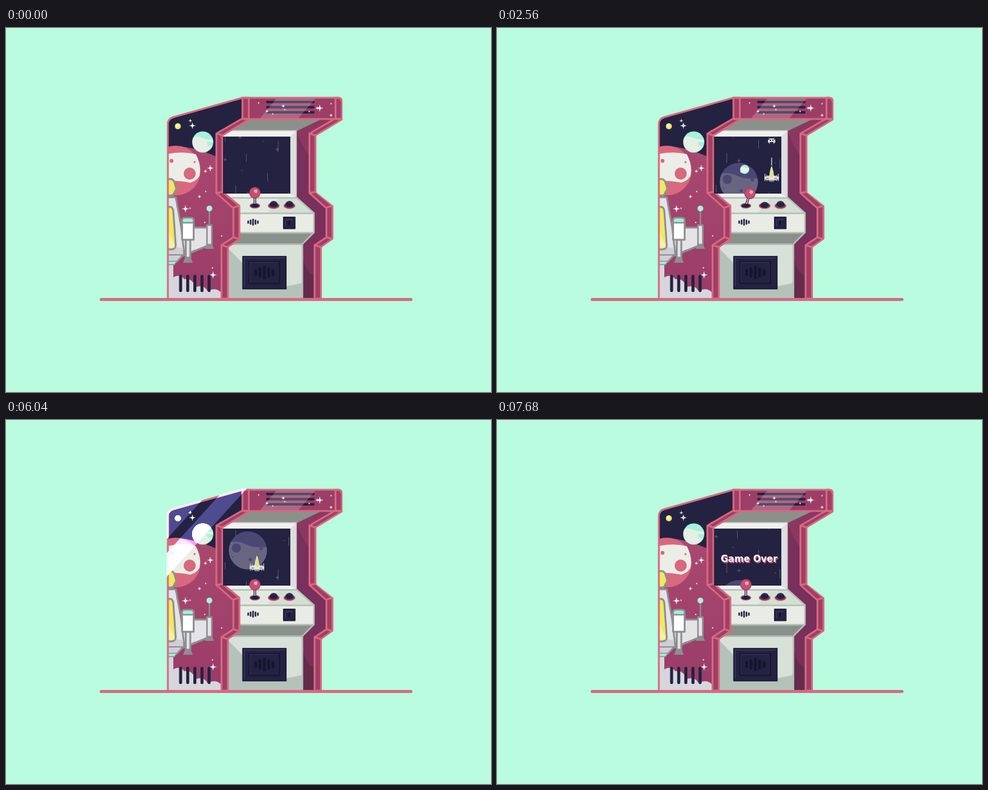
Recreate the animation shown at these times as an HTML page. Size 800 px wide and 600 px high, loop 7720 ms.

```html
<!DOCTYPE html>
<html lang="en">
<head>
<meta charset="utf-8">
<title>Arcade cabinet</title>
<style>
html, body { margin: 0; width: 100%; height: 100%; overflow: hidden; background: #b9fcdf; }
svg { display: block; width: 800px; height: 600px; }
.edge { fill: none; stroke: #d8687f; stroke-width: 3; stroke-linejoin: round; }
.metal { fill: #e4e4e7; stroke: #8d8f93; stroke-width: 3; stroke-linejoin: round; }
.bars { stroke: #232241; stroke-linecap: round; fill: none; }
.line { fill: none; stroke: #3a3960; stroke-width: 1.5; }
#shine { mix-blend-mode: color-dodge; fill: #8c8c8c; }
#over { font: bold 15px "DejaVu Sans", sans-serif; }
</style>
</head>
<body>
<svg viewBox="0 0 800 600">
<defs>
  <clipPath id="sideClip"><path d="M267 446V158Q267 150 276 147L390 115V150L347 175V272L375 296V345L355 358V446Z"/></clipPath>
  <clipPath id="screenClip"><path d="M358 179H469V273H358Z"/></clipPath>
  <clipPath id="cabinetClip"><path clip-rule="evenodd" d="M265 445V158Q265 148 276 145L390 113H547Q555 113 555 121V152L512 178V271L540 293V348L522 361V445ZM358 179V273H469V179Z"/></clipPath>
  <clipPath id="dimClip"><circle r="31.5"/></clipPath>
  <clipPath id="mintClip"><circle cx="324.5" cy="188" r="16.5"/></clipPath>
  <linearGradient id="dune" x2="0" y2="1"><stop stop-color="#a9486f"/><stop offset="1" stop-color="#993c68"/></linearGradient>
  <filter id="streak" x="-20%" y="-60%" width="140%" height="220%"><feGaussianBlur stdDeviation="0 2"/></filter>
  <g id="trim">
    <path class="edge" style="fill:#a03f66" d="M390 115H400.5V151L357 177V270L385 293V348L366 361V446H355.5V358L375 345V297L347 272V174L390 149Z"/>
    <path class="edge" d="M390 150H400M347 174L357 177M347 272L357 270M375 296L385 293M375 345L385 348M355 358L366 361"/>
  </g>
</defs>

<!-- side art -->
<g clip-path="url(#sideClip)">
  <path fill="#232241" d="M260 110H400V450H260Z"/>
  <path fill="url(#dune)" d="M260 198C285 190 322 200 347 212L400 230V450H260Z"/>
  <g id="sideStars" fill="#fff"></g>
  <circle cx="280" cy="235" r="41" fill="#d9687f"/>
  <path fill="#ebeee6" d="M260 209Q290 202 313 208Q323 226 319 244Q314 252 304 255Q284 251 260 252Z"/>
  <g fill="#d9687f"><circle cx="273" cy="219" r="3.2"/><circle cx="303" cy="240" r="10"/><circle cx="311" cy="221" r="1.7"/></g>
  <circle cx="324.5" cy="188" r="17.5" fill="#a6f2dc"/>
  <path fill="#e6efe4" clip-path="url(#mintClip)" d="M306 181Q315 177 324 181T343 183V207H306Z"/>
  <path fill="#a6f2dc" d="M331 188H341V194H333Z"/>
  <circle cx="283.5" cy="162" r="5" fill="#eee56d"/><circle cx="282.5" cy="161" r="3" fill="#f5f0ad"/>
  <path fill="#d6d6dc" d="M260 388H276V411Q287 405 294 414Q307 412 313 427Q326 422 332 433Q349 426 356 438V450H260Z"/>
  <path class="metal" d="M288 329H337V357L303 371L290 376Z"/>
  <path class="metal" d="M260 279H280L289 329L294 372L282 385H260Z"/>
  <path fill="#cfcfd5" d="M260 345Q276 364 292 362V372L281 384H260Z"/>
  <path fill="none" stroke="#8d8f93" stroke-width="2" d="M260 374H297L312 366"/>
  <path fill="#9ff0d8" stroke="#8d8f93" stroke-width="1.5" d="M260 384.5H282L278 390H260Z"/>
  <g fill="#f0e95d" stroke="#8d8f93" stroke-width="3">
    <path d="M260 249H273L277 252L281 265L275 276H260Z"/>
    <path d="M260 295H272Q275 296 276 302L280 358Q279 365 273 365H260Z"/>
  </g>
  <path fill="#f6f2a4" d="M267 330Q272 349 278 356V362H267Z"/>
  <path class="metal" d="M296.5 349H304V380H296.5Z"/>
  <path fill="#8d8f93" d="M296 377H304L308 387H292Z"/>
  <path class="metal" style="fill:#fff" d="M290.5 316Q291 313 295 313H305Q309 313 309.5 316V349H290.5Z"/>
  <path fill="#9ff0d8" d="M292 321V317Q292 314.5 295 314.5H305Q308 314.5 308 317V321Z"/>
  <path stroke="#8d8f93" stroke-width="2.5" d="M335.5 302V326M290 321H310"/>
  <path class="metal" style="stroke-width:2.5" d="M331.5 325H339.5V357H331.5Z"/>
  <path fill="#8d8f93" d="M331 357H340L343 364H328Z"/>
  <circle cx="335.5" cy="297.5" r="4.8" fill="#a6f2dc"/>
  <path id="vents" class="bars" stroke-width="5"/>
</g>
<path class="edge" d="M267 446V158Q267 150 276 147L392 114.5"/>

<!-- hood, inner wall, bezel -->
<path fill="#79305a" d="M400 151H545L500 175V272L528 296V345L509 358V446H489V356L508 337V304L479 280V169Z"/>
<path fill="#8b3860" d="M519 151H545L500 175V210Q486 190 479 169Z"/>
<path fill="#642c4b" d="M489 376Q494 402 509 409V446H489Z"/>
<path fill="#8a918b" d="M398 151H519L479 170H362Z"/>
<path fill="#f0f1ef" d="M356 169H479V280H356Z"/>
<path fill="#dcdfdd" d="M469 179L478 170V279L469 273Z"/>
<path fill="none" stroke="#c9bcc4" stroke-width="1.5" d="M360 169H479V280"/>
<path fill="#232241" d="M358 179H469V273H358Z"/>

<g clip-path="url(#screenClip)">
  <g id="sky" stroke="#67667f" fill="#67667f"></g>
  <g id="dim" clip-path="url(#dimClip)">
    <circle r="31.5" fill="#4a4775"/>
    <path fill="#676580" d="M-33 -13Q-18 -17 -3 -10T33 -6V33H-33Z"/>
    <g fill="#4a4775"><circle cx="-19" cy="-4" r="7.5"/><circle cx="22" cy="-3" r="2.6"/><circle cx="4" cy="15" r="2.6"/><circle cx="-25" cy="11" r="1.2"/></g>
  </g>
  <g id="red">
    <circle r="16.5" fill="#d9687f"/>
    <path fill="#ebeee6" d="M-16 -10Q0 -14 13 -9Q18 2 12 9Q0 14 -16 10Z"/>
    <g fill="#d9687f"><circle cx="4" cy="1" r="4"/><circle cx="11" cy="-4" r="1"/></g>
  </g>
  <g id="yellow">
    <circle r="12.8" fill="#f1e754"/>
    <path fill="#f6f4cc" d="M-12 -4Q-6 -8 0 -5T12 -4V3Q8 2 4 6T-11 5Z"/>
    <circle cx="6" cy="3" r="2.5" fill="#f1e754"/>
  </g>
  <g id="mint">
    <circle r="7.5" fill="#a6f2dc"/>
    <path fill="#e6f3e6" d="M-7 -2Q-3 -5 0 -3T7 -3V2Q2 6 -3 6T-7 2Z"/>
  </g>
  <path id="laser" stroke="#c9c8d1" stroke-width="1.5" d="M0 0V13"/>
  <g id="alien" fill="#dededf">
    <path d="M-4 -2L-2 -4H2L4 -2H6V3H4V2H-4V3H-6V-2Z"/>
    <path stroke="#dededf" d="M-3 -3L-5 -5M3 -3L5 -5M-3 2L-4 5M3 2L4 5"/>
    <path fill="#232241" d="M-3 -2h2v2h-2zM1 -2h2v2h-2z"/>
  </g>
  <g id="ship">
    <path stroke="#b9b9bd" stroke-width="1.5" d="M-11 0V12M11 0V12M-8 2V12M8 2V12"/>
    <path fill="#dedee0" d="M-12 5L-4 3H4L12 5V9L4 11H-4L-12 9Z"/>
    <path fill="#8d8f93" d="M-9 7H9V8.5H-9ZM-4 10H4V13H-4Z"/>
    <path fill="#e6e6e2" d="M-.7 -12H.7L3 -3L4.5 10H-4.5L-3 -3Z"/>
    <path fill="#eadf5a" d="M-1 -8H1L2 0V6H-2V0Z"/>
  </g>
  <path id="glint" fill="#fff" opacity=".22"/>
  <g id="over">
    <text x="370.5" y="235.5" fill="#d9566f" aria-hidden="true">Game Over</text>
    <text x="369" y="234" fill="#fff">Game Over</text>
  </g>
</g>

<!-- control deck and lower front -->
<path fill="#d3dfd5" d="M357 280H480L508 305H385Z"/>
<path fill="#e1e9e0" d="M357 280H450L430 305H385Z"/>
<path fill="#e9ece5" d="M385 305H508V337H385Z"/>
<path fill="#8a918b" d="M385 337H508L489 356H364Z"/>
<path fill="#d7e1d7" d="M366 356H489V446H366Z"/>
<path fill="#b4c2ba" d="M366 363L392 389L430 427Q460 428 489 420V446H366Z"/>
<path fill="none" stroke="#b4beb8" stroke-width="2.5" d="M357 280H480L508 305V337L489 356V446M385 305.5H508M385 337.5H508M366 356.5H489"/>
<path id="speaker" class="bars" stroke-width="2.6"/>
<path fill="#232241" stroke="#15162d" d="M457.5 311.5H477V331H457.5Z"/>
<path class="line" d="M461 327V316H473"/><path stroke="#101126" stroke-width="2" d="M467 317V325"/>
<path fill="#232241" stroke="#14152c" stroke-width="1.5" d="M390.5 376.5H462V430H390.5Z"/>
<path class="line" d="M393 427V379H460M402 420V386H450"/>
<path class="line" style="stroke:#14152c" d="M401 385H451V421H401Z"/>
<path id="door" class="bars" style="stroke:#14152c" stroke-width="4.5"/>

<g id="buttons"></g>
<ellipse cx="410.5" cy="293" rx="8" ry="3.8" fill="#232241" stroke="#b64b6e" stroke-width="1.5"/>
<g id="stick">
  <path stroke="#15162d" stroke-width="4" d="M410.5 277V292"/><path stroke="#f0f1ef" stroke-width="1.5" d="M410.5 277V290"/>
  <circle cx="410.5" cy="271.5" r="8.8" fill="#c4506f" stroke="#a13a60" stroke-width="1.2"/>
  <circle cx="412" cy="269" r="3" fill="#e9a3b2"/>
</g>

<!-- marquee and trims -->
<path fill="#9c3e66" d="M398 115H545V151H398Z"/>
<path class="bars" stroke-width="4" d="M431 122H507M431 130.500H507M431 139H507"/>
<g id="signStars" fill="#fff"></g>
<path fill="#fff" opacity=".2" d="M447 115H512L481 150H418Z"/>
<g clip-path="url(#cabinetClip)"><use href="#trim"/><use href="#trim" x="153.5"/></g>
<path class="edge" d="M390 115H547Q553.5 115 553.5 122M390 150H553"/>

<g id="shine" clip-path="url(#cabinetClip)"><g id="bands"></g></g>
<path stroke="#d56b84" stroke-width="5" stroke-linecap="round" d="M157 447.5H668"/>
</svg>

<script>
const LOOP = 7720, STEP = 40;
const $ = id => document.getElementById(id);
const move = (id, x, y) => $(id).setAttribute('transform', `translate(${x} ${y})`);
const show = (id, on) => $(id).style.display = on ? '' : 'none';
const repeat = (n, fn) => Array.from({ length: n }, (_, i) => fn(i)).join('');

let seed = 11;
const random = (min, max) => {
  seed = (seed * 16807) % 2147483647;
  return min + (max - min) * seed / 2147483647;
};

// Four-point sparkle
const sparkle = (x, y, r) => `<path stroke="#fff" stroke-width=".4" d="M${x} ${y - r}Q${x} ${y} ${x + r} ${y}Q${x} ${y} ${x} ${y + r}Q${x} ${y} ${x - r} ${y}Q${x} ${y} ${x} ${y - r}"/>`;
// Small stars spread evenly down or across a box, with seeded jitter
const scatter = (n, left, top, right, bottom) => repeat(n, i => {
  const x = random(left, right), y = top + (bottom - top) * (i + random(0, 1)) / n;
  return sparkle(x, y, i % 2 ? 2.6 : 1.3);
});
$('sideStars').innerHTML = sparkle(307.5, 161, 5) + sparkle(337, 231, 5) + sparkle(296, 298, 5.5) +
  sparkle(341.5, 407, 5.5) + scatter(22, 276, 140, 366, 410);
$('signStars').innerHTML = sparkle(517.5, 132, 5.5) + scatter(5, 408, 119, 460, 147) + scatter(4, 500, 119, 538, 147);

// Row of upright bars, shorter by `drop` per place from the middle
const bars = (x, gap, y, height, drop) => repeat(5, i => {
  const h = height - drop * Math.abs(i - 2);
  return `M${x + gap * i} ${y - h / 2}v${h}`;
});
$('vents').setAttribute('d', bars(288, 11.75, 421, 23.5, 0));
$('speaker').setAttribute('d', bars(399.5, 4, 320, 9, 3));
$('door').setAttribute('d', bars(412, 7.1, 403, 18, 5.5));

$('buttons').innerHTML = repeat(2, i => `<g transform="translate(${441.5 + 26 * i} 293)">
  <ellipse rx="9" ry="4.5" fill="#7a2e53" stroke="#c9526f" stroke-width="1.5"/>
  <g id="cap${i}"><path fill="#232241" d="M-7 -2Q-5 -8 0 -8T7 -2Q5 2 0 2T-7 -2"/>
  <path fill="none" stroke="#45446d" d="M-3 -5.5Q0 -7 3 -5.5"/></g></g>`);

// One tile of sky, stacked so that it can scroll without end
const TILE = 138;
const cross = (x, y) => `<path d="M${x - 2.5} ${y}h5m-2.5 -2.5v5"/>`;
const tile = cross(386, 180) + cross(447.5, 200) + cross(361.5, 217) + cross(399, 273) +
  repeat(7, i => `<path opacity=".8" d="M${361.5 + 17.5 * i} ${175 + i * 85 % TILE}v${12 + i * 5 % 9}"/>`) +
  repeat(3, i => `<circle cx="${389 + 35 * i}" cy="${235 - 48 * i}" r=".8" stroke="none"/>`);
$('sky').innerHTML = repeat(4, i => `<g transform="translate(0 ${TILE * (i - 2)})">${tile}</g>`);

// Slanted light bands lie between lines 1.1x + y = a and b
const SLANT = 1.1;
const band = (a, b) => {
  const x = (s, y) => (s - y) / SLANT;
  return `M${x(a, 100)} 100H${x(b, 100)}L${x(b, 450)} 450H${x(a, 450)}Z`;
};
$('bands').innerHTML = `<path d="${band(-142, -62)}"/><path d="${band(-39, 0)}"/>`;
$('glint').setAttribute('d', band(-70, 0));

const ramp = (t, from, to) => Math.min(1, Math.max(0, (t - from) / (to - from)));
const ease = (t, from, to) => { const p = ramp(t, from, to); return p * p * (3 - 2 * p); };

// Steering from -1 (left) to 1 (right); it leans the stick and shifts the ship
const steer = t => ease(t, 1700, 2400) - ease(t, 2800, 3500) - ease(t, 4100, 4900) + ease(t, 5200, 5950);
const ship = t => ({
  x: 414 + 39 * steer(t),
  y: 229 - 13 * Math.cos((t - 1000) / 3750 * 2 * Math.PI)
    + 80 * (1 - ease(t, 400, 1100)) - 110 * ramp(t, 6500, 6900) ** 2
});

const SHOTS = 3, FIRST_SHOT = 1400, SHOT_GAP = 1120, LASER = 0.3, ALIEN_Y = 186;

function drawBattle(t) {
  const shot = FIRST_SHOT + SHOT_GAP * Math.min(SHOTS - 1, Math.max(0, Math.floor((t - 900) / SHOT_GAP)));
  const { x, y } = ship(shot);
  const nose = y - 14, hit = shot + (nose - ALIEN_Y - 4) / LASER;
  show('alien', t >= shot - 400 && t < hit);
  show('laser', t >= shot && t < hit);
  move('alien', x, ALIEN_Y - 14 * (1 - ease(t, shot - 400, shot - 200)));
  move('laser', x, nose - LASER * (t - shot));
  move('cap0', 0, t >= shot - 40 && t < shot + 120 ? 1.5 : 0);
}

function draw(t) {
  move('sky', 0, t * 0.0327 % TILE);
  move('dim', 399, 128.4 + 0.0489 * (t % 4270));
  const fall = (id, x, y, at) => move(id, x, y + 0.09 * (t - at));
  fall('red', 361, 186, 1240);
  fall('yellow', 447.5, 238, 1240);
  if (t < 4000) fall('mint', 408.5, 233, 2560);
  else fall('mint', 408.5, 213, 5000);

  const { x, y } = ship(t);
  move('ship', x, y);
  $('ship').setAttribute('filter', t > 6640 ? 'url(#streak)' : 'none');
  drawBattle(t);
  $('stick').setAttribute('transform', `rotate(${18 * steer(t)} 410.5 293)`);

  show('shine', t > 5880 && t < 6840);
  move('bands', (550 + 0.784 * (t - 6040)) / SLANT, 0);
  show('glint', t > 6180 && t < 6800);
  move('glint', (833 + 0.5 * (t - 6720)) / SLANT, 0);
  show('over', t >= 7000);
}

const start = performance.now();
function frame() {
  const t = (performance.now() - start) % LOOP;
  draw(Math.floor(t / STEP) * STEP);
  requestAnimationFrame(frame);
}
frame();
</script>
</body>
</html>
```
